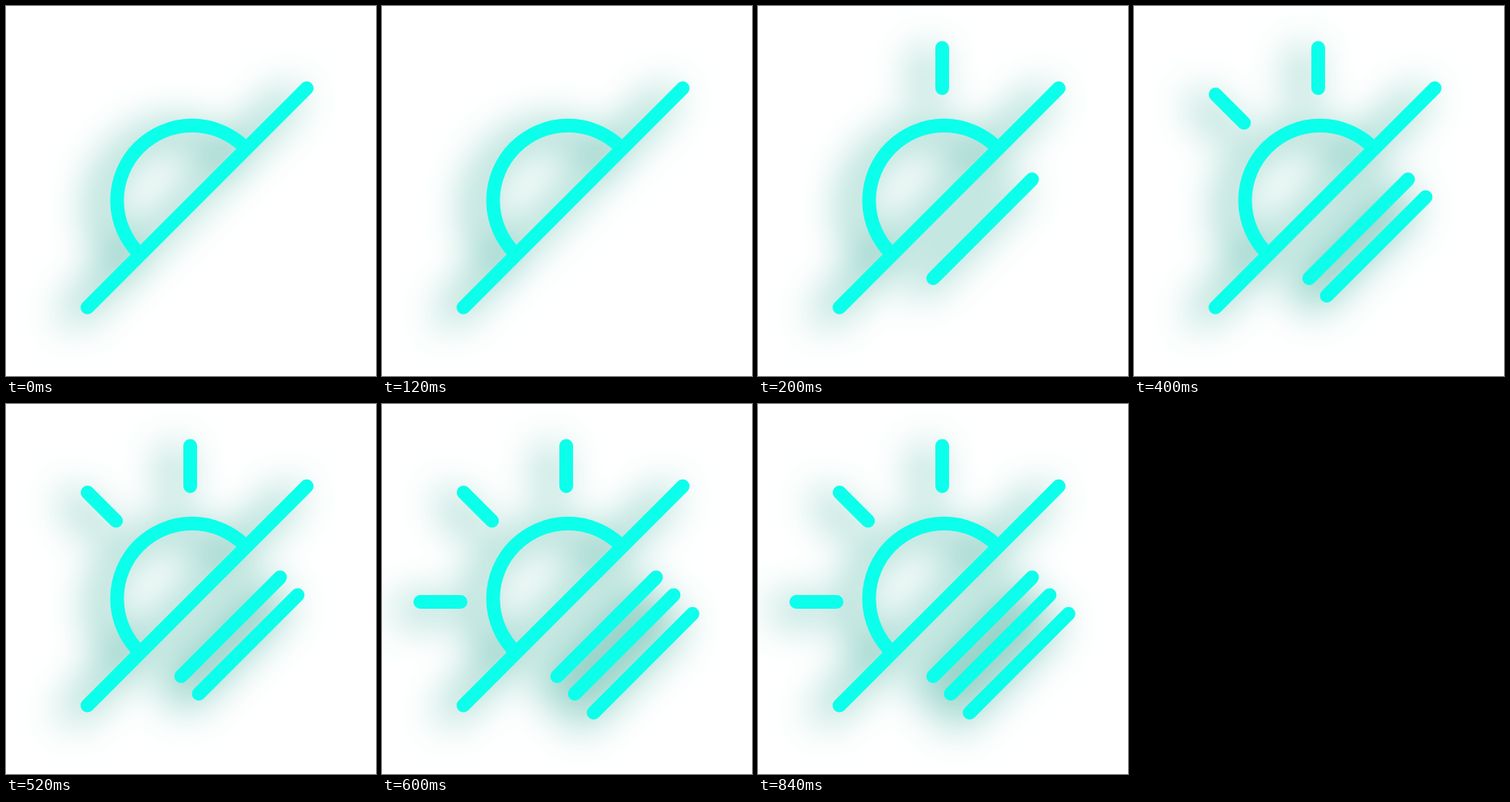
An HTML page with a canvas for the animation above (1000 ms loop, 459x459 px).

```html
<!DOCTYPE html>
<html lang="en">
<head>
<meta charset="utf-8">
<title>Sun and rays</title>
<style>
  html, body { margin: 0; width: 100%; height: 100%; overflow: hidden; background: #fff; }
  canvas { display: block; width: 459px; height: 459px; }
</style>
</head>
<body>
<canvas id="stage" width="459" height="459"></canvas>
<script>
const ctx = document.getElementById('stage').getContext('2d');
const SIZE = 459, LOOP = 1000, STEP = 200, LAST = 3;
const EIGHTH = Math.PI / 4;

// A line from (x, y), its direction counted in eighths of a turn.
function addLine(x, y, eighths, length) {
  const angle = eighths * EIGHTH;
  ctx.moveTo(x, y);
  ctx.lineTo(x + length * Math.cos(angle), y + length * Math.sin(angle));
}

// Rays turn from straight up towards the left, one per step.
const rayStarts = [[228.5, 102], [136.5, 145], [97.5, 245.5]];
function addRay(i) {
  const [x, y] = rayStarts[i];
  addLine(x, y, -2 - i, 50);
}

// Stripes step down and to the right, parallel to the horizon.
function addStripe(i) {
  const shift = 21 * i + 0.8 * i * i;
  addLine(217.3 + shift, 337.8 + shift, -1, 173.5);
}

function draw(step) {
  ctx.shadowColor = 'transparent';
  ctx.fillStyle = '#fff';
  ctx.fillRect(0, 0, SIZE, SIZE);

  ctx.lineWidth = 17;
  ctx.lineCap = 'round';
  ctx.strokeStyle = '#0cffeb';
  ctx.shadowColor = 'rgb(60, 174, 155)';
  ctx.shadowBlur = 52;
  ctx.shadowOffsetX = -20;
  ctx.shadowOffsetY = 10;

  // One path, so that all parts share a single soft shadow.
  ctx.beginPath();
  ctx.arc(230.8, 241.3, 93, 3 * EIGHTH, 7 * EIGHTH);
  addLine(101, 374, -1, 384.7);
  for (let i = 0; i < step; i++) {
    addRay(i);
    addStripe(i);
  }
  ctx.stroke();
}

let shown = -1;
function tick() {
  const step = Math.min(LAST, Math.floor((performance.now() % LOOP) / STEP));
  if (step !== shown) draw(shown = step);
  requestAnimationFrame(tick);
}
tick();
</script>
</body>
</html>
```
